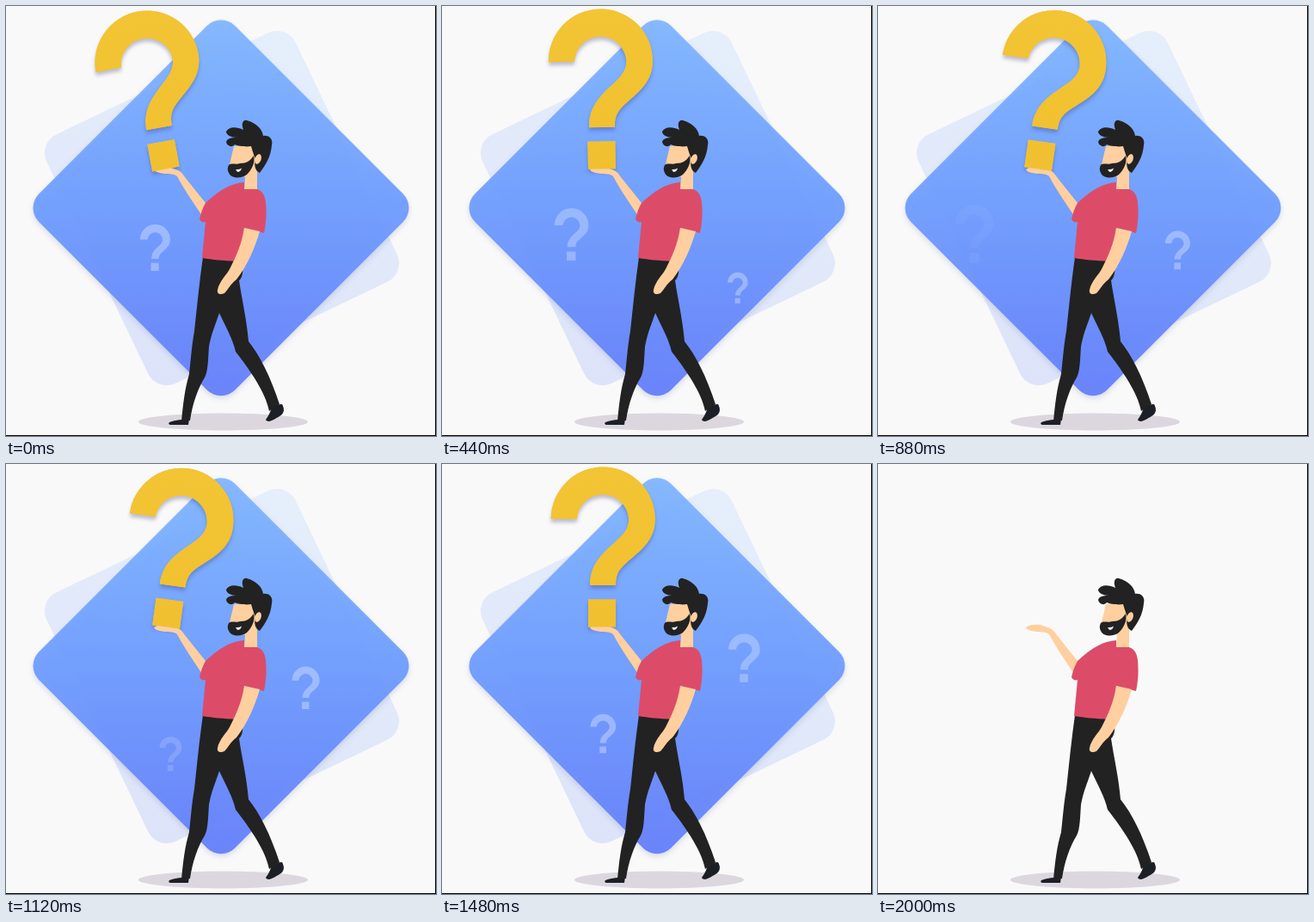
An HTML page for the animation above (2040 ms loop, 500 px wide and 500 px high).

```html
<!DOCTYPE html>
<html lang="en">
<head>
<meta charset="utf-8">
<title>Man balancing a question mark</title>
<style>
  html, body { margin: 0; width: 100%; height: 100%; overflow: hidden; background: #f9f9f9; }
  svg { display: block; width: 100vw; height: 100vh; }
  .shade { filter: drop-shadow(0 3px 3px rgba(70, 90, 160, .2)); }
  .lift { filter: drop-shadow(0 4px 2px rgba(50, 50, 120, .3)); }
  .skin { fill: #ffcf9f; }
  .dark { fill: #222; }
  .shoe { fill: #1c1f26; }
</style>
</head>
<body>
<svg viewBox="0 0 500 500">
  <defs>
    <linearGradient id="blue" x2="1" y2="1">
      <stop stop-color="#80b6ff"/>
      <stop offset=".5" stop-color="#6e9cff"/>
      <stop offset="1" stop-color="#637cfb"/>
    </linearGradient>
    <linearGradient id="pale" x1=".9" y1="0" x2=".1" y2="1">
      <stop stop-color="#e5eefb"/>
      <stop offset="1" stop-color="#dde4f9"/>
    </linearGradient>
    <linearGradient id="gold" gradientUnits="userSpaceOnUse" x1="0" y1="4" x2="0" y2="190">
      <stop stop-color="#f3c433"/>
      <stop offset="1" stop-color="#f0c030"/>
    </linearGradient>
    <path id="mark" d="M126.5 64A60.5 60.5 0 0 1 247.5 64C247.5 84 237 96 221 109C208 120 202 125 202 141H172C172 117 185 105 204 88C212 80.5 217 74 217 64A30.3 30.3 0 0 0 156.5 64ZM170 157.5h32v32h-32z"/>
  </defs>

  <g class="scene">
    <rect x="90.5" y="74.5" width="321" height="321" rx="24" fill="url(#pale)" transform="rotate(-25.6 251 235)"/>
    <g class="shade">
      <rect x="88.75" y="73.55" width="322.5" height="322.5" rx="23" fill="url(#blue)" fill-opacity=".94" transform="rotate(45 250 234.8)"/>
    </g>
    <use id="left" href="#mark" fill="#fff"/>
    <use id="right" href="#mark" fill="#fff"/>
    <g class="lift"><use id="big" href="#mark" fill="url(#gold)"/></g>
  </g>

  <ellipse cx="252.5" cy="483.5" rx="98.5" ry="10" fill="#dcd7df"/>

  <g id="man">
    <path class="shoe" d="M190 484C198 481 205 481 213 480L212 487H191Q188 486 190 484Z"/>
    <path class="shoe" d="M302 481C306 476 308 470 310 464L321 463C324 468 324 474 318 477C313 480 305 486 302 481Z"/>
    <path class="dark" d="M229 292L268 295L275 305C276 312 273 318 271 319C274 340 280 365 282 390C295 406 307 430 318 463L306 471C302 450 285 425 267 402C264 388 256 374 248 357C243 372 239 380 236 396C235 410 235 425 231 432C223 445 217 462 214 482L204 483C206 462 208 445 213 428C215 410 216 395 219 378C222 350 225 320 229 292Z"/>
    <path class="skin" d="M172 190C175 187 182 186 189 187L197 190C204 192 205 195 208 199L232 229L228 244C218 229 207 213 199 198C195 195 190 195 184 195C178 194 173 193 172 190Z"/>
    <path class="skin" d="M265 163L286 161L296 175L292 192V215H277L278 199L262 190L260 184Z"/>
    <path fill="#dc4c68" d="M277 205C262 206 248 214 232 229C228 236 226 243 225 248C227 251 229 252 232 251L228 293C240 295 252 296 268 297C273 285 276 272 277 258L300 264C303 250 303 240 302 228C301 220 298 215 292 213H277Z"/>
    <path class="skin" d="M277 258L295 262C290 280 280 303 268 318C262 322 258 330 254 334C249 336 245 335 246 330C248 320 257 312 260 306C267 292 274 278 277 258Z"/>
    <path class="dark" d="M256 146C259 140 268 140 276 144C273 136 276 132 280 133C291 136 298 143 299 151C306 150 311 155 309 162C308 175 302 185 295 194C290 192 288 185 290 178C287 170 286 166 285 163C280 164 270 163 266 161C263 165 257 163 256 158C257 154 262 153 268 153C262 153 256 150 256 146Z"/>
    <ellipse class="skin" cx="293" cy="178" rx="3.6" ry="6" transform="rotate(20 293 178)"/>
    <path class="dark" d="M259 185C262 182 268 185 272 183C280 183 284 180 288 174C290 182 286 190 280 196C274 201 262 201 259 194C257 190 258 187 259 185Z"/>
    <path fill="#e8eeee" d="M267 190Q271 190.500 274 188.500Q273 193 269 193Z"/>
  </g>

  <!-- The mark again, so that its shadow stays behind the hand -->
  <use class="scene" href="#big"/>
  <path d="M499 0h1v500H0v-1h499z"/>
</svg>
<script>
const LOOP = 2040, STEP = 40, SWING = 990, TILT = 10.5;
const el = id => document.getElementById(id);
const scene = document.querySelectorAll(".scene");

// Puts a faint mark of height h at (x, y); u is its age in seconds, 0 to 2.
function float(id, u, x, y, h) {
  const fade = Math.max(0, Math.min(1, u / .25, (2 - u) / .6));
  el(id).setAttribute("transform", `translate(${x} ${y}) scale(${h / 186}) translate(-187 -96.5)`);
  el(id).setAttribute("opacity", .31 * fade);
}

function draw(t) {
  for (const part of scene) part.style.display = t < 2000 ? "" : "none";

  const angle = TILT * (1 - 2 * Math.abs(t - SWING) / SWING);
  el("big").setAttribute("transform", `rotate(${angle} 186 190)`);

  const a = (t + 1040) % LOOP / 1000, b = t / 1000;
  float("left", a, 192.5 - 8.6 * a - 9 * a ** 3, 344.6 - 62.4 * a - 10.2 * a ** 2 + 11 * a ** 3, 38 + 15.5 * a);
  float("right", b, 348.5 + 26 * (b - 1) ** 3, 373 - 104 * b + 3 * b ** 2, 27.5 + 19.5 * b);
}

const start = performance.now();
function tick() {
  const t = (performance.now() - start) % LOOP;
  draw(Math.floor(t / STEP) * STEP);
  requestAnimationFrame(tick);
}
tick();
</script>
</body>
</html>
```
